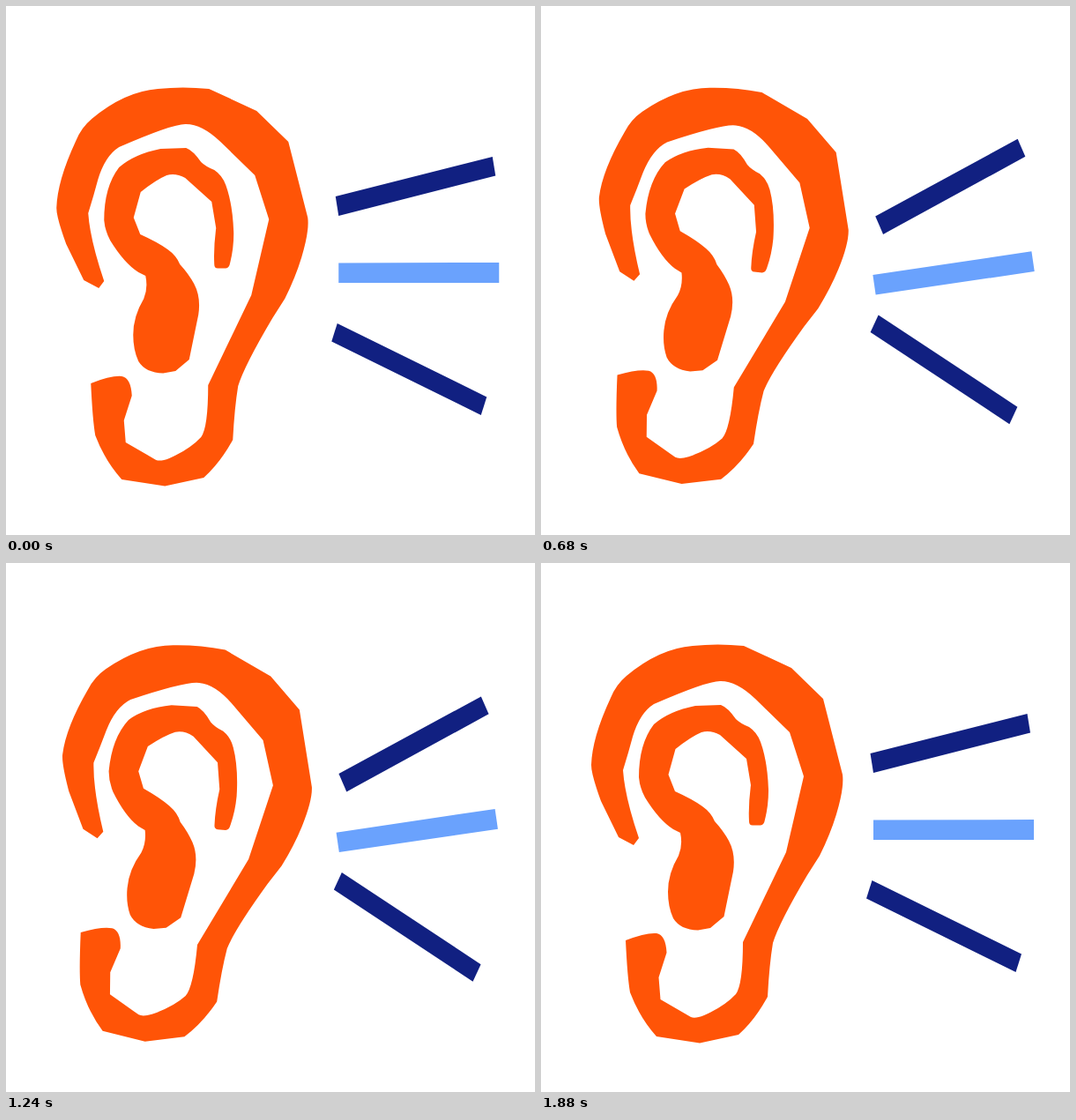
These frames come from a looping animation (600 by 600 pixels, 1.92 s). An HTML page:

```html
<!DOCTYPE html>
<html lang="en">
<head>
<meta charset="utf-8">
<title>Listening ear</title>
<style>
  html, body { margin: 0; width: 100%; height: 100%; overflow: hidden; background: #fff; }
  svg { display: block; width: 100%; height: 100%; }
  .ear { fill: #ff5407; }
  .navy { fill: #112081; }
  .sky { fill: #6aa2fd; }
</style>
</head>
<body>
<svg viewBox="0 0 600 600">
  <g id="scene">
    <g class="ear" data-pivot="196 320" data-turn="5.25">
      <path d="M96 428Q119 419 131 420C138 421 142 429 142.5 442L133.5 470L135.5 495L170 515
        Q175 517 185 513Q208 503 221 489Q229 478 229 430L278 328L298 242L282 192L243 154
        Q222 134 204 134Q190 133 128 160Q112 170 104 197L99 215L93 235Q95 265 111 312L105 320L88 311
        L68 270Q57 240 57 229Q58 198 79 153Q85 138 97 128Q134 97 172 94Q200 91 230 94
        L284 119L320 154L342 240Q344 255 335 285Q328 308 316 332L302 354Q270 408 263 431
        Q259 455 257 492Q243 518 224 535L180 544.5L131 537Q112 516 101 487Q98 470 96 428Z"/>
      <path d="M236 293Q236 297.5 240 297.5L249 297.5Q253 297 254 291Q258 275 258 258Q257 225 249 203
        Q245 192 236 186Q226 182 221 177Q212 164 204 161L175 162Q145 168 128 183Q111 205 111 243
        Q112 255 118 266Q134 292 150 302L158 306Q161 320 156 332Q144 352 144 373Q144 390 150 403
        Q158 416 178 416.5L192 414L207.5 401L218 350Q221 330 213 315Q207 304 197 293
        Q193 283 183 276Q172 268 152 259L144.5 240L152.5 211Q170 197 182 192Q192 189 203 195
        L233 222L238 252Q235 275 236 293Z"/>
    </g>
    <polygon class="navy" data-pivot="465.8 204.3" data-turn="-14.3" points="373.5,216 551.5,171 555,192.5 377,238"/>
    <polygon class="sky" data-pivot="470.5 302.6" data-turn="-8.3" points="377,291.5 559,291 559,314 377,314"/>
    <polygon class="navy" data-pivot="454.1 412.2" data-turn="7.2" points="375.5,360 545,443.5 538.5,464 369,380.5"/>
  </g>
</svg>
<script>
  const STEP = 40;
  const UPRIGHT = [0, 0.25, 1, 2, 3, 3.7];
  const TILTED = [0, -1, -1.8, -2.6, -3.3, -3.9];
  const HALF = UPRIGHT.length;

  const scene = document.getElementById("scene");
  const parts = [...scene.querySelectorAll("[data-turn]")];

  // The pose flips hard every half cycle while the whole scene drifts.
  function draw() {
    const tick = (Math.floor(performance.now() / STEP) + 1) % (HALF * 2);
    const tilted = tick >= HALF;
    const dx = (tilted ? TILTED : UPRIGHT)[tick % HALF];
    scene.setAttribute("transform", `translate(${dx} ${-0.3 * dx})`);
    for (const part of parts) {
      const { turn, pivot } = part.dataset;
      part.setAttribute("transform", `rotate(${tilted ? turn : 0} ${pivot})`);
    }
    requestAnimationFrame(draw);
  }
  draw();
</script>
</body>
</html>
```
